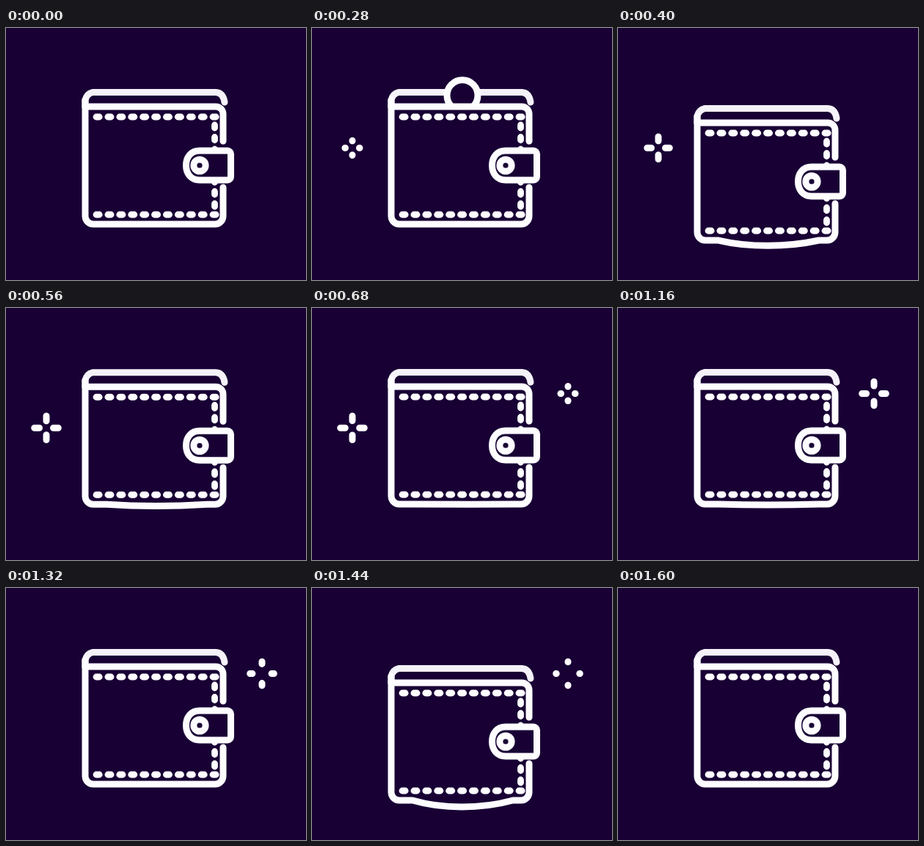
These frames come from a looping animation (409x343 px, 1760 ms). An HTML page:

```html
<!DOCTYPE html>
<html lang="en">
<head>
<meta charset="utf-8">
<title>Wallet</title>
<style>
  html, body { margin: 0; width: 100%; height: 100%; overflow: hidden; background: #180034; }
  svg { display: block; width: 409px; height: 343px; }
  .line { fill: none; stroke: #fdfcff; stroke-width: 9; stroke-linecap: round; stroke-linejoin: round; }
  .solid { fill: #180034; }
  .back { stroke: #f4f1f8; }
  .stitch { stroke-width: 8.8; }
  .button { stroke-width: 9; }
</style>
</head>
<body>
<svg viewBox="0 0 409 343">
  <g class="wallet">
    <path class="line back" d="M108 107V98Q110 89.5 118 87.5H286Q296 88 298 101"/>
  </g>
  <circle id="coin" class="line solid" cx="205" r="21"/>
  <g class="wallet">
    <path id="front" class="solid"/>
    <path id="outline" class="line"/>
    <path class="line" d="M108 107H286A10 10 0 0 1 296 117V154"/>
    <path id="stitches" class="line stitch"/>
    <path class="line solid" d="M264 167H302A4.5 4.5 0 0 1 306.5 171.5V202.5A4.5 4.5 0 0 1 302 207H264C252 207 245.5 198 245.5 187S252 167 264 167Z"/>
    <circle class="line button" cx="264" cy="187" r="8.1"/>
  </g>
  <path id="left" class="line"/>
  <path id="right" class="line"/>
</svg>
<script>
const LOOP = 1760, STEP = 40, START = 200, END = 1600;
const HITS = [370, 920, 1380]; // when each coin has pushed the wallet halfway down
const $ = id => document.getElementById(id);
const wallet = document.querySelectorAll('.wallet');

const clamp = x => Math.min(1, Math.max(0, x));
const smooth = x => (x = clamp(x)) * x * (3 - 2 * x);
const easeOut = x => 1 - (1 - clamp(x)) ** 2;

// p is the time in ms relative to a hit
const fall = p => -42 + 280 * clamp((p + 200) / 180) ** 1.5;
const dip = p => 23 * (smooth((p + 40) / 80) - smooth((p - 40) / 160));
const sag = p => {
  const x = Math.max(0, (p + 15) / 75);
  return 9 * (x * Math.exp(1 - x)) ** 2;
};

function stitchPath() {
  let d = '';
  for (let i = 0; i < 11; i++) {
    const x = 123 + 15.9 * i;
    d += `M${x} 121h4.2M${x} 254h4.2`;
  }
  for (let i = 0; i < 3; i++) {
    d += `M284.5 ${132 + 16.5 * i}v4M284.5 ${239 - 16.5 * i}v4`;
  }
  return d;
}

// Arms shoot out from the centre, then their inner ends follow
function sparkle(el, cx, cy, t) {
  const show = t > 0 && t < 920;
  el.style.display = show ? '' : 'none';
  if (!show) return;
  const b = 4 + 12.3 * easeOut(t / 280);
  const a = Math.min(b - .5, 9.5 + 6.8 * clamp((t - 400) / 440) ** 2);
  let d = '';
  for (const s of [-1, 1]) {
    d += `M${cx + s * a} ${cy}H${cx + s * b}M${cx} ${cy + s * a}V${cy + s * b}`;
  }
  el.setAttribute('d', d);
  el.style.strokeWidth = 9 * clamp(Math.min((t + 60) / 120, (960 - t) / 120));
}

function draw(time) {
  const t = Math.floor(time % LOOP / STEP) * STEP;
  const active = t >= START && t < END;
  const sum = f => active ? HITS.reduce((n, hit) => n + f(t - hit), 0) : 0;

  wallet.forEach(g => g.setAttribute('transform', `translate(0 ${sum(dip)})`));
  const next = HITS.find(hit => t < hit - 20);
  $('coin').setAttribute('cy', fall(active && next ? t - next : -200));

  const low = 267 + sum(sag) * 4 / 3;
  const bottom = `V256A11 11 0 0 1 285 267H274C230 ${low} 178 ${low} 137 267H119A11 11 0 0 1 108 256`;
  $('outline').setAttribute('d', `M296 217${bottom}V98`);
  $('front').setAttribute('d', `M108 107H286A10 10 0 0 1 296 117${bottom}Z`);

  sparkle($('left'), 55, 163.3, active ? t - 200 : 0);
  sparkle($('right'), 349, 116.5, active ? t - 600 : 0);
}

$('stitches').setAttribute('d', stitchPath());

function tick() {
  draw(performance.now());
  requestAnimationFrame(tick);
}
tick();
</script>
</body>
</html>
```
